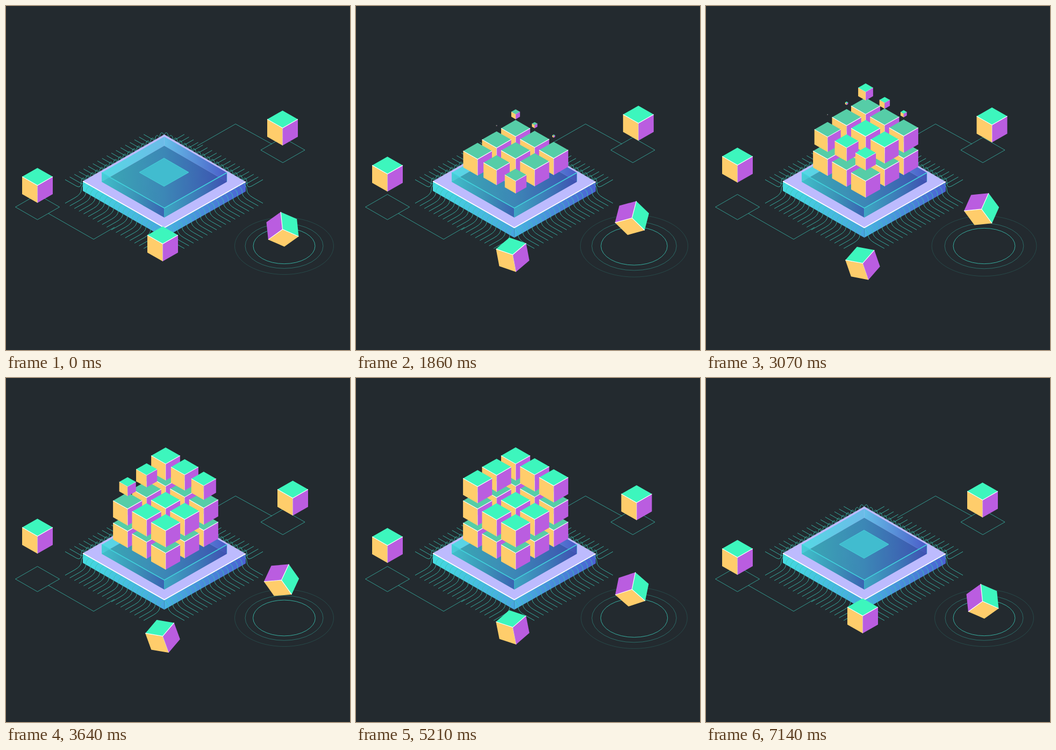
Write an HTML page that moves like this. It is 640 by 640 pixels and loops after 7210 ms.

```html
<!DOCTYPE html>
<html lang="en">
<head>
<meta charset="utf-8">
<title>Isometric chip</title>
<style>
  html, body { margin: 0; width: 100%; height: 100%; overflow: hidden; background: #232a2f; }
  svg { display: block; width: 100vw; height: 100vh; }
  .wire { fill: none; stroke: #3ac4b3; stroke-width: .85; }
</style>
</head>
<body>
<svg id="stage" viewBox="0 0 640 640">
  <defs>
    <linearGradient id="sideL"><stop stop-color="#45dbe0"/><stop offset="1" stop-color="#48a5df"/></linearGradient>
    <linearGradient id="sideR"><stop stop-color="#48b2e2"/><stop offset="1" stop-color="#4b62d3"/></linearGradient>
    <linearGradient id="wallL"><stop stop-color="#55d9e4"/><stop offset="1" stop-color="#6cbbe8"/></linearGradient>
    <linearGradient id="wallR"><stop stop-color="#66c0e8"/><stop offset="1" stop-color="#4a5cc8"/></linearGradient>
    <linearGradient id="floor"><stop stop-color="#3aa9b4"/><stop offset=".5" stop-color="#3c87b6"/><stop offset="1" stop-color="#3d50b0"/></linearGradient>
    <linearGradient id="glassL"><stop stop-color="#43c9d2"/><stop offset=".55" stop-color="#3c92b8"/><stop offset="1" stop-color="#3a54b0"/></linearGradient>
    <linearGradient id="glassR"><stop stop-color="#3fb2c6"/><stop offset=".5" stop-color="#3d86bb"/><stop offset="1" stop-color="#4050b2"/></linearGradient>
  </defs>
  <g id="tracks" class="wire" opacity=".85">
    <path d="M356 260L427 219.5L495 257M515 244.500L556 268L515 291.500L474 268Z"/>
    <path d="M79 386L163 434L202 411.500M58.500 350.500L99.500 374L58.500 397.500L17.500 374Z"/>
  </g>
  <path id="backWires" class="wire"/>
  <g id="chip">
    <path fill="url(#sideL)" d="M143 326L294.500 413V431L143 344Z"/>
    <path fill="url(#sideR)" d="M446 327L294.500 413V431L446 345Z"/>
    <path fill="#bdbbfe" d="M294.500 239L446 327L294.500 413L143 326Z"/>
    <path fill="none" stroke="#fff" stroke-width="1.8" d="M143 326L294.500 412.500L446 327"/>
    <path fill="url(#wallL)" d="M178 310L294.500 243V260L178 327Z"/>
    <path fill="url(#wallR)" d="M411 310L294.500 243V260L411 327Z"/>
    <path fill="url(#floor)" d="M294.500 260L411 327L294.500 393.500L178 327Z"/>
    <path fill="url(#glassL)" opacity=".7" d="M178 310L294.500 376V393.500L178 327Z"/>
    <path fill="url(#glassR)" opacity=".7" d="M411 310L294.500 376V393.500L411 327Z"/>
    <path fill="none" stroke="#41d3dc" stroke-width="1.5" d="M178 310L294.500 376L411 310"/>
    <path fill="none" stroke="#41d3dc" stroke-width=".8" opacity=".6" d="M294.500 376V393M411 310V327"/>
    <path fill="#41bccf" stroke="#45cfd8" d="M294 283L340 309.500L294 335.500L248 309.500Z"/>
  </g>
  <path id="frontWires" class="wire"/>
  <g id="rings" class="wire"></g>
  <g id="stack"></g>
  <g id="floaters"></g>
</svg>
<script>
const LOOP = 7210, CYCLE = 7140;   // the pose rests after CYCLE
const $ = id => document.getElementById(id);
const clamp = v => Math.min(1, Math.max(0, v));
const ease = v => (1 - Math.cos(Math.PI * clamp(v))) / 2;
const GREEN = '#3df6bd', DIM = '#56cda7', YELLOW = '#ffcd6b', PURPLE = '#ba5de0';

function add(parent, tag, attrs = {}) {
  const el = document.createElementNS('http://www.w3.org/2000/svg', tag);
  for (const name in attrs) el.setAttribute(name, attrs[name]);
  return parent.appendChild(el);
}

// Hexagonal cube around 0,0; flip = -1 shows it from below.
function cube(parent, top = GREEN, flip = 1) {
  const g = add(parent, 'g');
  const face = (fill, d) => add(g, 'path', { fill, d });
  if (flip > 0) {
    face(top, 'M0 0L-28.500 -16.250L0 -32.500L28.500 -16.250Z');
    face(YELLOW, 'M0 0V32.500L-28.500 16.250V-16.250Z');
    face(PURPLE, 'M0 0V32.500L28.500 16.250V-16.250Z');
  } else {
    face(YELLOW, 'M0 0L-28.500 16.250L0 32.500L28.500 16.250Z');
    face(PURPLE, 'M0 0V-32.500L-28.500 -16.250V16.250Z');
    face(top, 'M0 0V-32.500L28.500 -16.250V16.250Z');
  }
  const line = { fill: 'none', stroke: '#fff', 'stroke-width': 1.2 };
  add(g, 'path', { ...line, d: `M-28.500 ${-16.25 * flip}L0 0L28.500 ${-16.25 * flip}` });
  add(g, 'path', { ...line, opacity: flip > 0 ? .5 : 1, d: `M0 0V${32.5 * flip}` });
  return g;
}

function place(el, x, y, scale = 1, angle = 0) {
  el.setAttribute('transform', `translate(${x} ${y}) rotate(${angle}) scale(${scale})`);
}

// Smooth periodic curve through [time, value] keys.
function curve(keys) {
  const n = keys.length;
  const at = i => {
    const turn = Math.floor(i / n), k = keys[i - turn * n];
    return [k[0] + turn * CYCLE, k[1]];
  };
  const slope = i => {
    const a = at(i - 1), b = at(i + 1);
    return (b[1] - a[1]) / (b[0] - a[0]);
  };
  return t => {
    let i = n - 1;
    while (keys[i][0] > t) i--;
    const [t0, a] = at(i), [t1, b] = at(i + 1);
    const h = t1 - t0, u = (t - t0) / h, w = 1 - u;
    return a * (1 + 2 * u) * w * w + b * u * u * (3 - 2 * u)
      + h * u * w * (slope(i) * w - slope(i + 1) * u);
  };
}

// Repeats one pin along both edges; shape gets a point mapper.
function pins(dir, shape) {
  let d = '';
  for (const side of [-1, 1]) {
    for (let k = 0; k < 18; k++) {
      d += shape((x, y) => `${294 + side * (x - 294 - 8.6 * k)} ${y + dir * 4.95 * k} `);
    }
  }
  return d;
}
$('frontWires').setAttribute('d', pins(1, p =>
  `M${p(441, 330)}Q${p(448, 334)}${p(448, 342)}Q${p(448, 350)}${p(460, 356.8)}L${p(478, 367)}`));
$('backWires').setAttribute('d', pins(-1, p =>
  `M${p(440, 327)}C${p(441, 318)}${p(448, 317)}${p(448, 328)}Q${p(448, 340)}${p(457, 335)}L${p(478, 323)}`));

const rings = [
  { r: 57.5, grow: 5, start: 0, opacity: 1 },
  { r: 72.5, grow: 6.3, start: .125, opacity: .5 },
  { r: 92, grow: 9, start: .25, opacity: .23 }
].map(o => ({ ...o, el: add($('rings'), 'ellipse', { cx: 517.5, cy: 446.5, opacity: o.opacity }) }));

const layers = [
  { y: 242.9, start: 45, step: 140, time: 1050 },
  { y: 201.4, start: 1382, step: 108, time: 1300 },
  { y: 159.9, start: 2410, step: 130, time: 1300 }
];
const stack = [];
layers.forEach((layer, level) => {
  let order = 0;
  for (let i = 0; i < 3; i++) for (let j = 0; j < 3; j++) {
    const inner = i > 0 && j > 0;
    if (level === 2 && inner) continue;
    const lit = level === 2 || (level === 1 && inner);
    stack.push({
      el: cube($('stack'), lit ? GREEN : DIM),
      x: 297 + 35.4 * (j - i), y: layer.y + 21.1 * i + 20.3 * j,
      start: layer.start + layer.step * order++, time: layer.time
    });
  }
});

const [left, right, front, tilted] = [1, 1, 1, -1].map(flip => cube($('floaters'), GREEN, flip));
const rightX = curve([[0, 514.5], [1140, 521.5], [1600, 524], [2500, 528.5], [3640, 533.5], [5210, 522], [6430, 517.5]]);
const rightY = curve([[0, 227], [1140, 220.2], [1600, 217.9], [2500, 219.6], [3640, 223.5], [5210, 232], [6430, 229.3]]);
const tilt = curve([[0, -6], [1140, 7], [2500, 20], [3640, 25], [5210, 11.5], [6430, -2.5]]);

function draw(t) {
  const sway = (1 - Math.cos(2 * Math.PI * t / CYCLE)) / 2;
  place(left, 58.5, 333.7 - 39.5 * sway);
  place(right, rightX(t), rightY(t));
  place(front, 291.5, 442.5 + 38 * sway, 1, -20 * sway);
  place(tilted, 514.5 - 2 * sway, 415.5 - 39.5 * sway, 1, tilt(t));

  const beat = t / CYCLE * 2 % 1;
  for (const { el, r, grow, start } of rings) {
    const rx = r + grow * Math.sin(Math.PI * clamp((beat - start) / .77));
    el.setAttribute('rx', rx);
    el.setAttribute('ry', rx * .576);
  }

  for (const c of stack) {
    const s = ease((t - c.start) / c.time);
    c.el.style.display = s < .02 ? 'none' : '';
    place(c.el, c.x, c.y, s * .95);
  }
  const out = ease((t - 6300) / 840), k = 1 - .53 * out;
  $('stack').setAttribute('transform', `translate(297 243) scale(${k}) translate(-297 -243)`);
  $('stack').setAttribute('opacity', 1 - out);
}

const begin = performance.now();
function tick() {
  draw(Math.min(CYCLE, (performance.now() - begin) % LOOP));
  requestAnimationFrame(tick);
}
tick();
</script>
</body>
</html>
```
